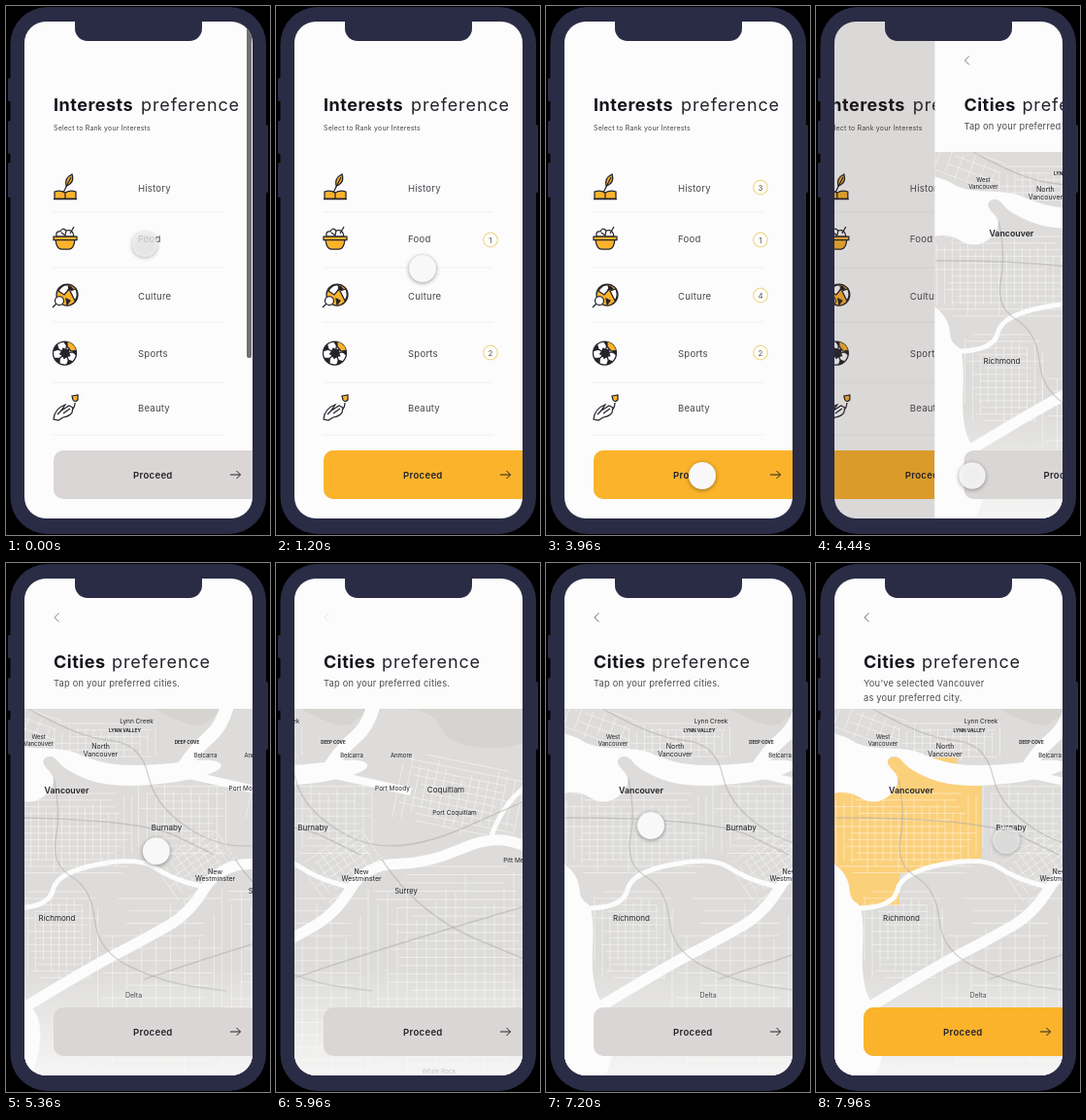
An HTML page with a canvas that plays this animation: 272x544 px, repeating every 8000 ms.

```html
<!DOCTYPE html>
<html lang="en">
<head>
<meta charset="utf-8">
<title>Preferences</title>
<style>
html, body { margin: 0; width: 100%; height: 100%; overflow: hidden; background: #000; }
canvas { display: block; width: 272px; height: 544px; }
</style>
</head>
<body>
<canvas id="stage"></canvas>
<script>
const LOOP = 8000;
const INK = '#25232b', PAGE = '#fcfcfc', AMBER = '#fbb32b', GREY = '#dad6d5', LAND = '#dddcda';
const canvas = document.getElementById('stage');
const ctx = canvas.getContext('2d');
const dpr = window.devicePixelRatio || 1;
canvas.width = 272 * dpr;
canvas.height = 544 * dpr;

const clamp = v => Math.max(0, Math.min(1, v));
const lerp = (a, b, k) => a + (b - a) * k;
function ramp(t, start, end) {
  const v = clamp((t - start) / (end - start));
  return v * v * (3 - 2 * v);
}

function text(str, x, y, size, { weight = 400, spacing = 0, color = INK, align = 'left' } = {}) {
  ctx.font = `${weight} ${size}px Inter, sans-serif`;
  ctx.letterSpacing = spacing + 'px';
  ctx.textAlign = align;
  ctx.fillStyle = color;
  ctx.fillText(str, x, y);
}

function box(x, y, w, h, r, fill) {
  ctx.beginPath();
  ctx.roundRect(x, y, w, h, r);
  ctx.fillStyle = fill;
  ctx.fill();
}

function disc(x, y, r, fill, stroke, width = 1) {
  ctx.beginPath();
  ctx.arc(x, y, r, 0, 7);
  if (fill) { ctx.fillStyle = fill; ctx.fill(); }
  if (stroke) { ctx.strokeStyle = stroke; ctx.lineWidth = width; ctx.stroke(); }
}

function line(points, color, width) {
  ctx.beginPath();
  points.forEach(p => ctx.lineTo(...p));
  ctx.strokeStyle = color;
  ctx.lineWidth = width;
  ctx.stroke();
}

// Smooth curve through the midpoints of a polyline.
function curve(...points) {
  const path = new Path2D(), last = points.length - 1;
  path.moveTo(...points[0]);
  for (let i = 1; i < last; i++) {
    const [x, y] = points[i], [nx, ny] = points[i + 1];
    path.quadraticCurveTo(x, y, (x + nx) / 2, (y + ny) / 2);
  }
  path.lineTo(...points[last]);
  return path;
}

function shape(d, fill) {
  const path = new Path2D(d);
  if (fill) { ctx.fillStyle = fill; ctx.fill(path); }
  ctx.stroke(path);
}

function bookIcon() {
  shape('M-11 4Q-5 2 0 5Q5 2 11 4V11H-11Z', AMBER);
  shape('M-12 11.5H12M0 5V11');
  shape('M1-2Q-1-10 7-14Q10-5 1-2Z', AMBER);
  shape('M-2 5L6-11');
}

function bowlIcon() {
  shape('M-9-2Q-10-8-5-7Q-3-12 1-8Q8-10 9-2Z', '#fff');
  shape('M5-5L9-12M-4-6L0-3L1-8');
  shape('M-10 1H10Q9 11 4 11H-4Q-9 11-10 1Z', AMBER);
  shape('M-12-2H12V1.5H-12Z', AMBER);
}

function globeIcon() {
  disc(2, -1, 11, AMBER, INK, 1.25);
  shape('M-7-5Q-3-12 3-11L4-7L-1-1Z', '#fff');
  shape('M5-5L11-7Q14 0 10 5Z', '#fff');
  shape('M5-10L8-7L3-6Z', INK);
  shape('M1 3L5 5L2 9Z', INK);
  disc(-6, 5, 4.5, '#fff', INK, 1.25);
  shape('M-9 8L-13 12');
}

function ballIcon() {
  disc(-0.5, 0, 12, '#fff', INK, 1.25);
  ctx.save();
  ctx.clip(curveDisc(12));
  for (let i = 0; i < 5; i++) {
    ctx.save();
    ctx.rotate((i + 0.15) * Math.PI * 0.4);
    shape('M0 0L-3-4H3Z', INK);
    shape('M0-4V-9');
    shape('M-4-12L0-8L4-12Z', INK);
    ctx.restore();
  }
  shape('M2-12L2-7L6-2L12-3V-12Z', AMBER);
  ctx.restore();
}

function curveDisc(r) {
  const path = new Path2D();
  path.arc(-0.5, 0, r, 0, 7);
  return path;
}

function handIcon() {
  shape('M-12 12Q-11 1 0-3L-4 3L4-2L8 0L7 5Q4 9-2 10L-7 13Z', '#fff');
  shape('M-4 3L-8 7M5 1L-2 6M10-5Q10 0 7 2');
  shape('M7-12L13-13V-8Q10-5 8-8Z', AMBER);
}

// Label, icon, text centre, divider below, rank, time of selection.
const interests = [
  ['History', bookIcon, 187, 212, 3, 1680],
  ['Food', bowlIcon, 239, 269, 1, 180],
  ['Culture', globeIcon, 298, 325, 4, 2400],
  ['Sports', ballIcon, 357, 387, 2, 820],
  ['Beauty', handIcon, 413, 441]
];

function heading(bold, x) {
  text(bold, 49, 108, 18, { weight: 700, spacing: 0.5, color: '#15131b' });
  text('preference', x, 108, 18, { spacing: 0.9 });
}

function proceedButton(active) {
  box(49, 457, 230, 50, 10, GREY);
  ctx.globalAlpha = active;
  box(49, 457, 230, 50, 10, AMBER);
  ctx.globalAlpha = 1;
  text('Proceed', 131, 485.5, 9.6, { weight: 600, spacing: 0.3 });
  line([[231, 482], [241.5, 482]], INK, 1);
  line([[237.5, 478], [241.5, 482], [237.5, 486]], INK, 1);
}

function interestsPage(t) {
  box(0, 0, 272, 544, 0, PAGE);
  heading('Interests', 139);
  text('Select to Rank your Interests', 49, 127.5, 7, { spacing: 0.18, color: '#444' });
  for (const [label, icon, y, divider, rank, chosen] of interests) {
    ctx.save();
    ctx.translate(61, y);
    ctx.strokeStyle = INK;
    ctx.lineWidth = 1.25;
    icon();
    ctx.restore();
    text(label, 136, y + 3.5, 9.6, { spacing: 0.2, color: '#48464c' });
    line([[48, divider], [224, divider]], '#f0f0f0', 1);
    if (!rank) continue;
    const cy = rank === 1 ? y + 1.5 : y - 0.5;
    ctx.globalAlpha = ramp(t, chosen, chosen + 160);
    disc(221, cy, 7.3, '#fffefa', '#efd98f', 1.2);
    text(rank, 221, cy + 3, 8, { align: 'center', color: '#555' });
    ctx.globalAlpha = 1;
  }
  proceedButton(ramp(t, 180, 400));
  ctx.globalAlpha = 1 - ramp(t, 100, 500);
  box(248, 18, 5, 344, 2.5, '#707070');
  ctx.globalAlpha = 1;
}

const noise = n => { const s = Math.sin(n * 127.1) * 43758.5; return s - Math.floor(s); };
const streets = new Path2D();

// Street block around a centre, with ragged line ends.
function addStreets(cx, cy, w, h, gap, tilt = 0) {
  const c = Math.cos(tilt), s = Math.sin(tilt);
  const at = (x, y) => [cx + x * c - y * s, cy + x * s + y * c];
  const ragged = (half, seed) => half * (1 - noise(seed) * 0.5);
  for (let x = -w / 2; x <= w / 2; x += gap) {
    streets.moveTo(...at(x, -ragged(h / 2, x + cx)));
    streets.lineTo(...at(x, ragged(h / 2, x + cy)));
  }
  for (let y = -h / 2; y <= h / 2; y += gap * 0.85) {
    streets.moveTo(...at(-ragged(w / 2, y + cy), y));
    streets.lineTo(...at(ragged(w / 2, y + cx), y));
  }
}
addStreets(55, 168, 70, 36, 12, 0.35);
addStreets(138, 184, 105, 38, 8);
addStreets(92, 278, 158, 82, 8);
addStreets(217, 261, 90, 78, 9);
addStreets(91, 385, 82, 94, 8);
addStreets(234, 310, 76, 50, 8, -0.6);
addStreets(356, 242, 136, 73, 9, 0.2);
addStreets(349, 426, 182, 228, 10);
addStreets(196, 440, 132, 190, 15);

const bay = curve([0, 172], [28, 176], [48, 190], [98, 191], [118, 200], [145, 208], [192, 208], [250, 200],
  [262, 212], [215, 226], [140, 231], [96, 213], [83, 196], [70, 204], [88, 222], [76, 241], [56, 248], [32, 233], [0, 242]);
const sea = curve([0, 298], [20, 308], [34, 326], [35, 346], [50, 354], [46, 442], [76, 470], [60, 545], [0, 545]);
const inletArm = curve([264, 145], [258, 168], [232, 190], [215, 215]);
const eastInlet = curve([215, 216], [260, 226], [302, 235]);
const northArm = curve([45, 355], [80, 354], [88, 318], [172, 302], [205, 324], [246, 335]);
const mainRiver = curve([30, 472], [118, 418], [182, 385], [225, 360], [255, 310], [320, 309], [385, 280], [430, 294]);
const sideRiver = curve([385, 280], [396, 252], [425, 225]);
const highways = [
  curve([85, 222], [92, 255], [82, 310], [124, 335], [130, 400], [200, 432], [262, 440]),
  curve([50, 145], [110, 180], [175, 185], [190, 255], [282, 305], [430, 240]),
  curve([20, 262], [172, 262], [250, 300]),
  curve([272, 305], [310, 362], [430, 412]),
  curve([178, 428], [260, 400], [430, 350])
];
const peaks = curve([180, 145], [232, 176], [255, 150], [325, 150], [342, 190], [430, 190], [430, 145]);
const city = new Path2D('M0 200H145V212H171V303L86 320V352H34L0 300Z');

function place(name, x, y, size = 6.5, weight = 400) {
  name.split('\n').forEach((part, i) =>
    text(part, x, y + i * (size + 0.5), size, { weight, align: 'center', color: '#222129' }));
}

function placeNames() {
  place('West\nVancouver', 69, 181, 6);
  place('North\nVancouver', 133, 191, 7);
  place('Lynn Creek', 170, 165);
  place('LYNN VALLEY', 158, 174, 4.8, 700);
  place('DEEP COVE', 222, 186, 4.5, 700);
  place('Belcarra', 241, 200, 6);
  place('Anmore', 292, 200, 6);
  place('Port Moody', 283, 233.5);
  place('Coquitlam', 338, 236, 8);
  place('Port Coquitlam', 347, 258.5);
  place('Pitt Meadows', 418, 307.5);
  place('Burnaby', 201, 275, 8);
  place('New\nWestminster', 251, 319.5, 7);
  place('Surrey', 297, 339.5, 7.6);
  place('Vancouver', 98, 237, 8.8, 600);
  place('Richmond', 88, 367.5, 8);
  place('Delta', 167, 447, 7);
  place('White Rock', 331, 525);
}

function river(path, width) {
  ctx.lineWidth = width;
  ctx.stroke(path);
}

function map(pan, chosen) {
  ctx.save();
  ctx.beginPath();
  ctx.rect(19, 150, 235, 378);
  ctx.clip();
  box(0, 150, 272, 394, 0, LAND);
  ctx.save();
  ctx.translate(-163 * pan, 0);
  ctx.fillStyle = '#d5d4d1';
  ctx.fill(peaks);
  ctx.globalAlpha = chosen;
  ctx.fillStyle = '#fbd07a';
  ctx.fill(city);
  ctx.globalAlpha = 1;
  ctx.strokeStyle = 'rgba(255,255,255,.6)';
  river(streets, 0.75);
  ctx.fillStyle = ctx.strokeStyle = PAGE;
  ctx.fill(bay);
  ctx.fill(sea);
  river(inletArm, 14);
  river(eastInlet, 8);
  river(northArm, 5);
  river(mainRiver, 11);
  river(sideRiver, 5);
  ctx.strokeStyle = 'rgba(172,170,167,.5)';
  highways.forEach(path => river(path, 1.4));
  placeNames();
  ctx.restore();
  const fade = ctx.createLinearGradient(0, 415, 0, 527);
  fade.addColorStop(0, 'rgba(252,252,252,0)');
  fade.addColorStop(1, 'rgba(252,252,252,.78)');
  box(0, 415, 272, 120, 0, fade);
  ctx.restore();
}

function citiesPage(t) {
  const pan = ramp(t, 5150, 5850) - ramp(t, 6200, 6950);
  const chosen = ramp(t, 7450, 7650);
  box(19, 0, 253, 544, 0, PAGE);
  ctx.globalAlpha = 1 - 0.85 * pan;
  line([[54.5, 51.5], [50, 56], [54.5, 60.5]], '#77757a', 1);
  ctx.globalAlpha = 1;
  heading('Cities', 109);
  const lines = t < 7500 ? ['Tap on your preferred cities.'] : ['You’ve selected Vancouver', 'as your preferred city.'];
  lines.forEach((str, i) => text(str, 49, 127.3 + i * 14.5, 9.3, { spacing: 0.2, color: '#4d4b50' }));
  map(pan, chosen);
  proceedButton(chosen);
}

// Pointer stops: time, x, y.
const stops = [
  [0, 143, 245], [320, 147, 243], [700, 150, 357], [950, 150, 357], [1200, 151, 270], [1520, 155, 189],
  [1820, 155, 189], [2250, 159, 298], [2600, 160, 299], [3040, 163, 385], [3500, 161, 483], [4700, 161, 483],
  [5100, 205, 300], [5800, 45, 288], [6200, 45, 270], [6850, 150, 270], [7200, 108, 270], [7600, 106, 268],
  [7960, 196, 285], [LOOP, 198, 285]
];
const taps = [70, 800, 1650, 2380, 4300, 7430];

function pointer(t) {
  const i = stops.findIndex(s => s[0] > t);
  const [t0, x0, y0] = stops[i - 1], [t1, x1, y1] = stops[i];
  const k = ramp(t, t0, t1);
  const press = Math.max(...taps.map(tap => 1 - ramp(Math.abs(t - tap), 60, 180)));
  const hidden = ramp(t, 5750, 5900) - ramp(t, 6050, 6200);
  ctx.save();
  ctx.globalAlpha = (1 - 0.28 * press) * (1 - hidden) * (1 - 0.35 * ramp(t, 7650, 7960));
  ctx.shadowColor = 'rgba(0,0,0,.4)';
  ctx.shadowBlur = 4 * dpr;
  ctx.shadowOffsetY = dpr;
  disc(lerp(x0, x1, k), lerp(y0, y1, k), 14 - press, '#f8f8f8');
  ctx.restore();
}

function phoneBody() {
  const shell = '#2a2b45';
  box(0, 0, 272, 544, 0, '#000');
  box(2, 74, 5, 24, 1.5, shell);
  box(2, 118, 5, 34, 1.5, shell);
  box(2, 161, 5, 36, 1.5, shell);
  box(265, 122, 5, 70, 1.5, shell);
  box(4.5, 1, 263.5, 542, 38, shell);
}

function notch() {
  box(71, 10, 131, 26, 13, '#2a2b45');
  box(71, 10, 131, 12, 0, '#2a2b45');
}

function draw(t) {
  ctx.setTransform(dpr, 0, 0, dpr, 0, 0);
  phoneBody();
  ctx.save();
  ctx.beginPath();
  ctx.roundRect(19, 16, 235, 511, 22);
  ctx.clip();
  const push = 1 - (1 - clamp((t - 4340) / 300)) ** 2;
  if (push < 1) {
    ctx.save();
    ctx.translate(-70 * push, 0);
    interestsPage(t);
    ctx.restore();
    box(0, 0, 272, 544, 0, `rgba(60,45,40,${0.31 * push})`);
  }
  if (push > 0) {
    ctx.save();
    ctx.translate(235 * (1 - push), 0);
    citiesPage(t);
    ctx.restore();
  }
  pointer(t);
  notch();
  ctx.restore();
}

const start = performance.now();
function tick() {
  draw((performance.now() - start) % LOOP);
  requestAnimationFrame(tick);
}
tick();
</script>
</body>
</html>
```
